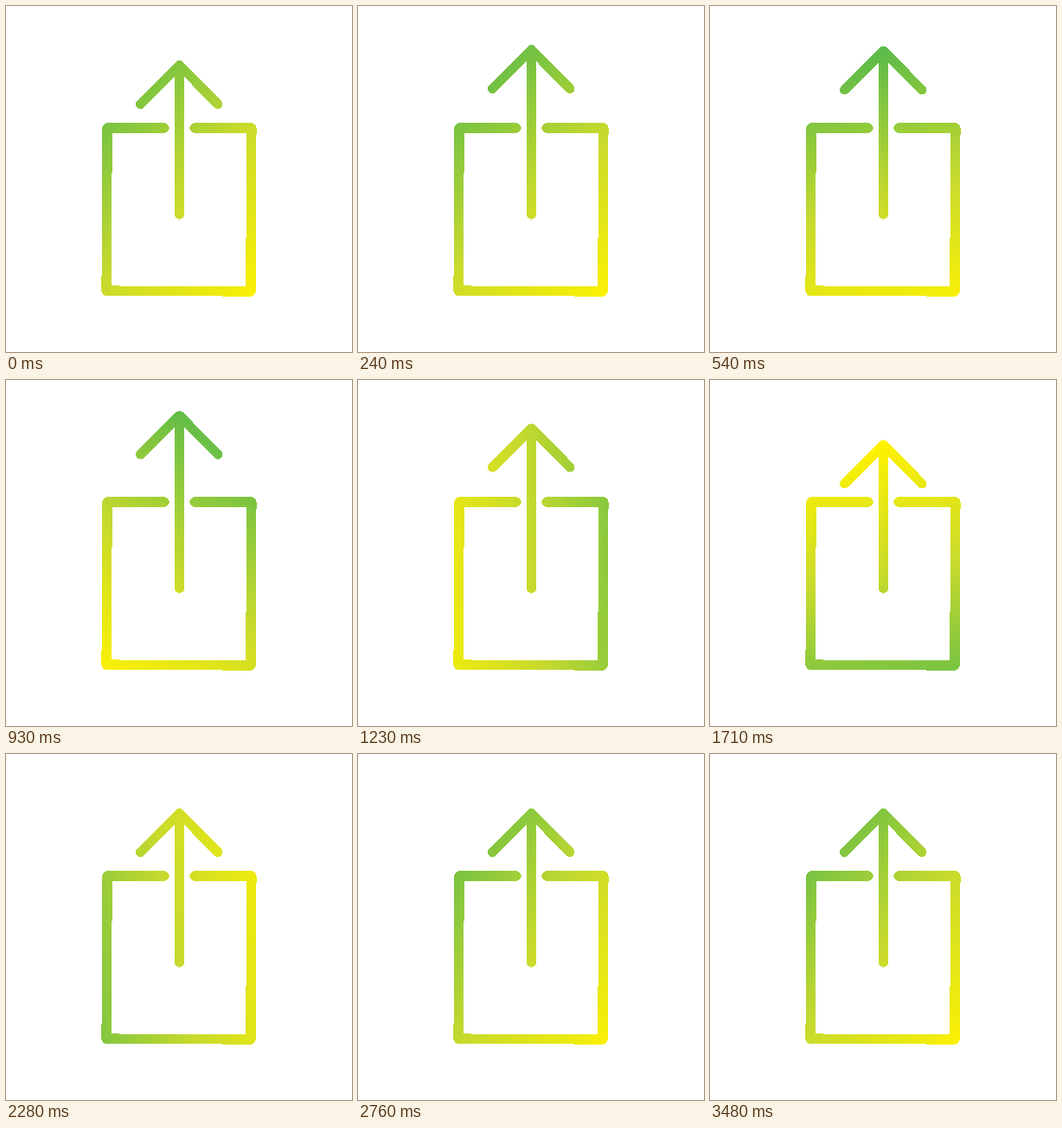
An HTML page for the animation above (5660 ms loop, 400 by 400 pixels).

```html
<!DOCTYPE html>
<html lang="en">
<head>
<meta charset="utf-8">
<title>Share arrow</title>
<style>
  html, body { margin: 0; width: 100%; height: 100%; overflow: hidden; background: #fff; }
  svg { display: block; width: 400px; height: 400px; }
  path { fill: none; stroke: url(#sweep); stroke-linecap: round; stroke-linejoin: round; }
</style>
</head>
<body>
<svg viewBox="0 0 400 400" shape-rendering="crispEdges">
  <linearGradient id="sweep" gradientUnits="userSpaceOnUse">
    <stop offset="0" stop-color="#5aba4a"/>
    <stop offset="0.53" stop-color="#c8da2d"/>
    <stop offset="1" stop-color="#fff200"/>
  </linearGradient>
  <path stroke-width="11.5" d="M183 141H117L116.2 329.2L283 329.9L283.8 141H218"/>
  <path id="arrow" stroke-width="11"/>
</svg>
<script>
const sweep = document.getElementById('sweep');
const arrow = document.getElementById('arrow');

const LOOP = 5660;
const SPIN = 3000;
const START_ANGLE = -48; // direction of the green end, clockwise from up
const TOP = -28, LOW = -8, DIP = 8.5;
const RISE = 405, DROP = 1400, LAND = 1765, REST = 2140;

// smooth step from 0 to 1 between two times
function ease(t, from, to) {
  const p = Math.min(Math.max((t - from) / (to - from), 0), 1);
  return p * p * (3 - 2 * p);
}

// rise, bob twice, drop just past the resting place and settle
function headOffset(t) {
  if (t < RISE) return TOP * ease(t, 0, RISE);
  if (t < DROP) {
    const phase = 4 * Math.PI * (t - RISE) / (DROP - RISE);
    return (TOP + LOW) / 2 + (TOP - LOW) / 2 * Math.cos(phase);
  }
  return TOP + (DIP - TOP) * ease(t, DROP, LAND) - DIP * ease(t, LAND, REST);
}

function setEnd(n, angle, reach) {
  sweep.setAttribute('x' + n, 200 + Math.sin(angle) * reach);
  sweep.setAttribute('y' + n, 225 - Math.cos(angle) * reach);
}

function draw(t) {
  const angle = (START_ANGLE + 360 * ease(t, 0, SPIN)) * Math.PI / 180;
  setEnd(1, angle, 170);
  setEnd(2, angle, -150);

  const y = 68.5 + headOffset(t);
  arrow.setAttribute('d', `M155.5 ${y + 45}L200.5 ${y}L245 ${y + 45}M200.5 ${y}V241`);
}

const start = performance.now();
function tick() {
  draw((performance.now() - start) % LOOP);
  requestAnimationFrame(tick);
}
tick();
</script>
</body>
</html>
```
